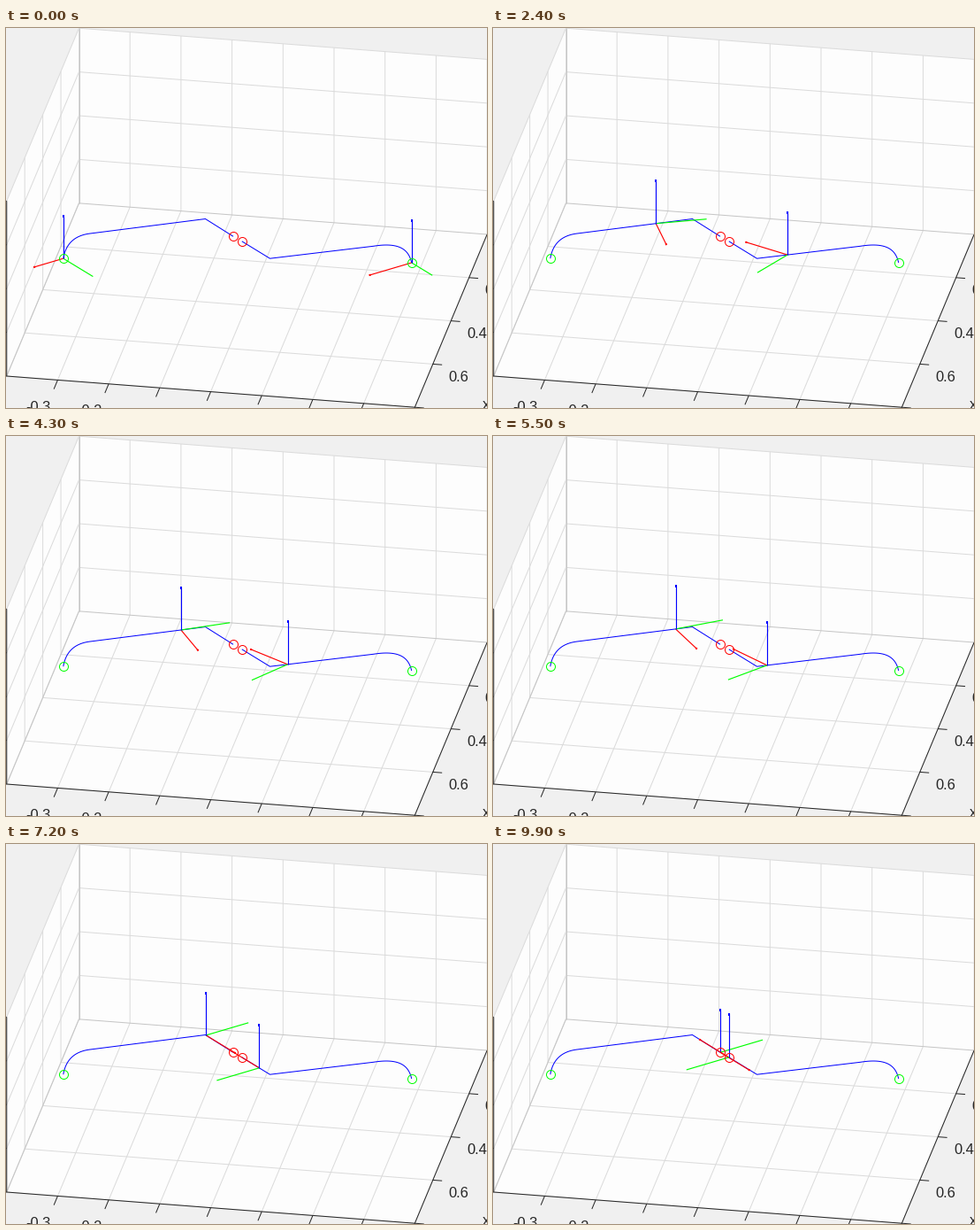
Animation of 544 by 429 pixels, one loop 10000 ms. Source, as a matplotlib script:

```python
import numpy as np
import matplotlib.pyplot as plt
from matplotlib.animation import FuncAnimation

W, H, DPI = 544, 429, 100
PX = 72 / DPI
FRAMES, INTERVAL = 100, 100
RED, GREEN, BLUE = "#ff0000", "#00ff00", "#0000ff"

# screen vectors of the 3D axes, per 0.1 unit
EX = np.array([-10.22, 24.4])
EY = np.array([57.7, 4.4])
EZ = np.array([0, -49.4])
CORNER = np.array([83, 198.3])

plt.rcParams["font.family"] = "Liberation Sans"
fig = plt.figure(figsize=(W / DPI, H / DPI), dpi=DPI, facecolor="#f0f0f0")
ax = fig.add_axes([0, 0, 1, 1])
ax.set_xlim(0.5, W + 0.5)
ax.set_ylim(H + 0.5, 0.5)
ax.axis("off")


def at(x, y, z):
    return CORNER + x * EX + y * EY + z * EZ


def line(*pts, color, lw=1.0, zorder=2):
    xs, ys = zip(*pts)
    return ax.plot(xs, ys, color=color, lw=lw * PX, zorder=zorder,
                   solid_capstyle="butt")[0]


def ring(p, color):
    ax.plot(*p, "o", ms=10 * PX, mfc="none", mec=color, mew=PX, zorder=6)


def label(x, y, s):
    ax.text(x, y, s, size=16.5 * PX, color="#262626", ha="left", va="baseline")


def draw_box():
    for u, v in ((8 * EX, 8 * EY), (8 * EY, 4 * EZ), (8 * EX, 4 * EZ)):
        wall = [CORNER, CORNER + u, CORNER + u + v, CORNER + v]
        ax.fill(*zip(*wall), color="#fdfdfd", lw=0, zorder=0)

    grid = "#dbdbdb"
    for y in range(9):
        line(at(8, y, 0), at(0, y, 0), at(0, y, 4), color=grid, zorder=1)
    for x in range(2, 9, 2):
        line(at(x, 8, 0), at(x, 0, 0), at(x, 0, 4), color=grid, zorder=1)
    for z in range(1, 5):
        line(at(8, 0, z), at(0, 0, z), at(0, 8, z), color=grid, zorder=1)
    for edge in (8 * EX, 8 * EY, 4 * EZ):
        line(CORNER, CORNER + edge, color="#c6c6c6", zorder=1)

    dark = "#262626"
    line(at(8, 0, 4), at(8, 0, 0), at(8, 8, 0), at(0, 8, 0), color=dark)
    for y in range(1, 9):
        p = at(8, y, 0)
        line(p, p + 0.42 * EX, color=dark)
        label(p[0] - 36, p[1] + 35.5, f"{(y - 4) / 10:g}")
    for x in range(2, 9, 2):
        p = at(x, 8, 0)
        line(p, p + 0.18 * EY, color=dark)
        if x < 8:
            label(p[0] + 18, p[1] + 19.5, f"{x / 10:g}")
    for z in range(5):
        p = at(8, 0, z)
        line(p, p - 0.18 * EY, color=dark)
    label(539.5, 430, "x")


def bezier(*p):
    a, b, c, d = np.array(p, float)
    t = np.linspace(0, 1, 40)[:, None]
    s = 1 - t
    return s**3 * a + 3 * s * s * t * b + 3 * s * t * t * c + t**3 * d


def smoother(t):
    return t**3 * (6 * t * t - 15 * t + 10)


def ease_out(power):
    return lambda t: 1 - (1 - t)**power


class Arm:
    """A coordinate triad that travels along a path and turns by 90 degrees."""

    def __init__(self, curve, bend, goal, start, stages, turn, short):
        self.path = np.vstack([curve, bend, goal])
        self.x0, self.bend = curve[0][0], bend[0]
        self.start, self.stages = start, stages
        self.turn, self.short = turn, short
        line(*self.path, color=BLUE, zorder=3)
        ring(curve[0], GREEN)
        ring(goal, RED)
        self.shafts = [line((0, 0), (0, 0), color=c, lw=1.15, zorder=5)
                       for c in (RED, GREEN, BLUE)]
        self.heads = [line((0, 0), (0, 0), color=c, lw=2, zorder=5)
                      for c in (RED, BLUE)]

    def x_at(self, f):
        x, begin = self.x0, self.start
        for end, goal, ease in self.stages:
            t = np.clip((f - begin) / (end - begin), 0, 1)
            x += (goal - x) * ease(t)
            if t < 1:
                break
            begin = end
        return x

    def pose(self, f):
        x = self.x_at(f)
        px, py = self.path[np.argsort(self.path[:, 0])].T
        p = np.array([x, np.interp(x, px, py)])
        u = np.clip((x - self.x0) / (self.bend - self.x0), 0, 1)
        a = np.radians(-45 + self.turn * u)
        c, s = np.cos(a), np.sin(a)
        axes = [c * EX + s * EY, -s * EX + c * EY, EZ]
        axes[self.short] = axes[self.short] * min(1, 0.7 + 0.5 * u)
        for v, shaft in zip(axes, self.shafts):
            shaft.set_data(*zip(p, p + v))
        for v, size, head in zip(axes[::2], (2, 3), self.heads):
            head.set_data(*zip(p + v * (1 - size / np.hypot(*v)), p + v))
        return self.shafts + self.heads


draw_box()
arms = [
    Arm(bezier((65.3, 260.7), (68, 245), (77, 235), (95, 232.6)),
        (226, 216), (257.5, 235.8), 2,
        [(22, 183.3, smoother), (66, 215, ease_out(1)),
         (99, 257.5, ease_out(1.6))], 90, short=0),
    Arm(bezier((459.2, 265.5), (456, 251), (446, 242), (416, 246.8)),
        (299, 260.7), (267.3, 241.3), 0,
        [(11, 344, smoother), (66, 303.5, ease_out(1.1)),
         (81, 267.3, ease_out(1.2))], -90, short=1),
]


def update(f):
    return [artist for arm in arms for artist in arm.pose(f)]


anim = FuncAnimation(fig, update, frames=FRAMES, interval=INTERVAL,
                     repeat=True, repeat_delay=0)
plt.show()
```
